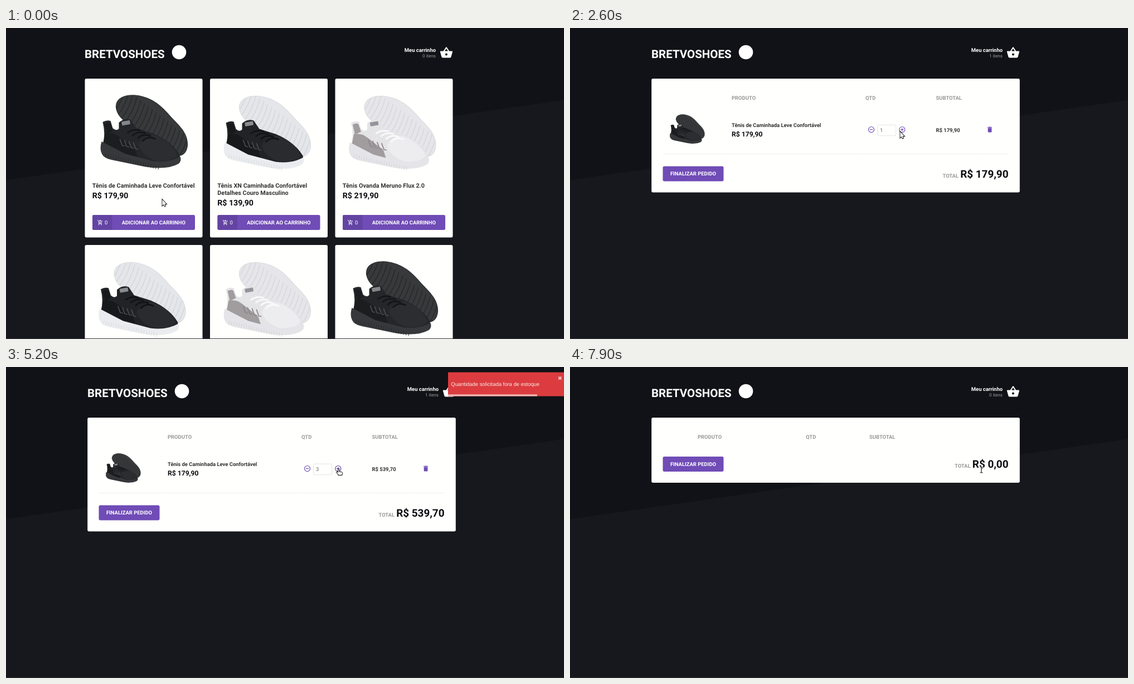
Recreate the animation shown at these times as an HTML page. Size 1001x559 px, loop 8000 ms.

```html
<!DOCTYPE html>
<html lang="pt-BR">
<head>
<meta charset="utf-8">
<title>Carrinho</title>
<style>
html, body { margin: 0; width: 100%; height: 100%; overflow: hidden; background: #17181d; }
svg { display: block; width: 1001px; height: 559px; font-family: Roboto, sans-serif; text-rendering: geometricPrecision; }
</style>
</head>
<body>
<svg id="stage" viewBox="0 0 1001 559"></svg>
<script>
const LOOP = 8000;
const PURPLE = '#704cb6', PURPLE_DARK = '#5f409c', PAPER = '#fffffd', GREY = '#999', INK = '#0b0b10', TEXT = '#333';
const SMALL = 9.43;

const ICON = {
  addCart: 'M11 9h2V6h3V4h-3V1h-2v3H8v2h3v3zm-4 9c-1.1 0-1.99.9-1.99 2S5.9 22 7 22s2-.9 2-2-.9-2-2-2zm10 0c-1.1 0-1.99.9-1.99 2s.89 2 1.99 2 2-.9 2-2-.9-2-2-2zm-9.83-3.25l.03-.12.9-1.63h7.45c.75 0 1.41-.41 1.75-1.03l3.86-7.01L19.42 4h-.01l-1.1 2-2.76 5H8.53l-.13-.27L6.16 6l-.95-2-.94-2H1v2h2l3.6 7.59-1.35 2.45c-.16.28-.25.61-.25.96 0 1.1.9 2 2 2h12v-2H7.42c-.13 0-.25-.11-.25-.25z',
  basket: 'M17.21 9l-4.38-6.56c-.19-.28-.51-.42-.83-.42s-.64.14-.83.43L6.79 9H2c-.55 0-1 .45-1 1 0 .09.01.18.04.27l2.54 9.27c.23.84 1 1.46 1.92 1.46h13c.92 0 1.69-.62 1.93-1.46l2.54-9.27L23 10c0-.55-.45-1-1-1h-4.79zM9 9l3-4.4L15 9H9zm3 8c-1.1 0-2-.9-2-2s.9-2 2-2 2 .9 2 2-.9 2-2 2z',
  trash: 'M6 19c0 1.1.9 2 2 2h8c1.1 0 2-.9 2-2V7H6v12zM19 4h-3.5l-1-1h-5l-1 1H5v2h14V4z'
};

const text = (x, y, s, { size = SMALL, fill = TEXT, bold = true, anchor = 'start', id = '' } = {}) =>
  `<text ${id && `id="${id}"`} x="${x}" y="${y}" font-size="${size}" fill="${fill}" font-weight="${bold ? 700 : 400}" text-anchor="${anchor}">${s}</text>`;
const rect = (x, y, w, h, fill, r = 0, extra = '') =>
  `<rect x="${x}" y="${y}" width="${w}" height="${h}" rx="${r}" fill="${fill}" ${extra}/>`;
const path = (d, fill, extra = '') => `<path d="${d}" fill="${fill}" ${extra}/>`;
const line = (d, color, w) => path(d, 'none', `stroke="${color}" stroke-width="${w}" stroke-linecap="round" stroke-linejoin="round"`);
const icon = (name, x, y, k, fill, id = '') => path(ICON[name], fill, `id="${id}" transform="translate(${x} ${y}) scale(${k})"`);
const group = (id, body) => `<g id="${id}">${body}</g>`;

// Shoe pairs, drawn in card coordinates
const BACK = 'M56 52C55 35 71 29 91 30C121 33 139 51 155 70C169 85 184 97 184 119C183 135 173 140 163 138L81 81C67 75 58 65 56 52Z';
const UPPER = 'M32 78Q39 74 46 76L50 89Q56 95 61 90L61 79Q71 70 82 74L92 89L121 98Q155 112 170 137Q172 147 165 150L127 152L31 121Q38 101 32 78Z';
const SOLE = 'M30 113Q25 129 33 139Q38 144 48 146L106 158Q147 165 168 153Q174 148 171 140Q150 152 121 148L72 135Z';
const LOOKS = {
  black: { back: '#38393b', groove: '#28292b', rim: '#2b2c2e', upper: '#252629', mesh: '#2c2d31', heel: '#1c1d1f', sole: '#37383b', ridge: '#28292b', lace: '#141517', tag: '#85868a' },
  mixed: { back: '#e5e6ea', groove: '#d6d7dc', rim: '#dcdde1', upper: '#222326', mesh: '#2a2b2f', heel: '#18191b', sole: '#ebecef', ridge: '#d9dade', lace: '#111214', tag: '#8b8c90' },
  white: { back: '#e6e6ea', groove: '#d7d7dc', rim: '#dcdce0', upper: '#e4e4e7', mesh: '#ededef', heel: '#a19c9e', sole: '#e5e5e9', ridge: '#d4d4d9', lace: '#fafafb', tag: '#96949a' }
};

function shoe(look) {
  const c = LOOKS[look];
  let grooves = '', ridges = '', laces = '', bars = '';
  for (let i = 0; i < 18; i++) {
    const x = 56 + i * 7, y = 46 + i * 5.4;
    grooves += `M${x - 20} ${y + 28}Q${x + 6} ${y + 12} ${x + 16} ${y - 28}`;
  }
  for (let i = 0; i < 22; i++) ridges += `M${38 + i * 4.5} ${135 + i * 1.05}l-1 6`;
  for (let i = 0; i < 4; i++) {
    laces += `M${77 + i * 9} ${97 + i * 5}Q${86 + i * 9} ${90 + i * 4} ${99 + i * 9} ${93 + i * 5}`;
    bars += `M${63 + i * 8} ${109 + i * 2}l4 11l4 1`;
  }
  return path(BACK, c.back) +
    `<g clip-path="url(#tread)">${line(grooves, c.groove, 1.6)}</g>` +
    line(BACK, c.rim, 1.2) +
    path(UPPER, c.upper) +
    path('M96 119Q108 99 126 102Q156 114 166 137Q160 148 130 148Q104 141 96 119Z', c.mesh) +
    path('M37 98Q52 96 62 105L90 127L96 146L32 124Z', c.heel) +
    path('M35 81Q41 78 45 80L50 94L39 99Z', c.heel) +
    path(SOLE, c.sole) + line(ridges, c.ridge, 1) +
    line(bars, look === 'white' ? '#8c878a' : '#4a4b4f', 1.8) + line(laces, c.lace, 2.8) +
    rect(66, 76, 15, 7, c.tag, 1, 'transform="rotate(-10 74 79)"');
}

const GRID_X = [141.5, 366, 590.5];
const PRODUCTS = [
  { look: 'black', name: ['Tênis de Caminhada Leve Confortável'], price: 'R$ 179,90' },
  { look: 'mixed', name: ['Tênis XN Caminhada Confortável', 'Detalhes Couro Masculino'], price: 'R$ 139,90' },
  { look: 'white', name: ['Tênis Ovanda Meruno Flux 2.0'], price: 'R$ 219,90' }
];

function card(p, x, y, id) {
  const end = 195.5 + (p.name.length - 1) * 13.5;
  const shift = p.look === 'black' ? '0 0' : '-3.5 1.5';
  const tag = s => id ? id + s : '';
  return `<g transform="translate(${x} ${y})">` +
    rect(0, 0, 211, 285.5, PAPER, 2.7) +
    `<g transform="translate(${shift})">${shoe(p.look)}</g>` +
    p.name.map((s, i) => text(13.3, 195.5 + i * 13.5, s, { size: 10.8 })).join('') +
    text(13.3, end + 19, p.price, { size: 14.15, fill: INK }) +
    rect(13.5, 245, 184, 27, PURPLE, 2.7, `id="${tag('Button')}"`) +
    path('M49 245H16.2a2.7 2.7 0 0 0-2.7 2.7v21.6a2.7 2.7 0 0 0 2.7 2.7H49z', '#6344a3') +
    icon('addCart', 22, 253.3, .449, '#fff') +
    text(35.4, 262.2, '0', { fill: '#fff', bold: false, id: tag('Count') }) +
    text(123.3, 262, 'ADICIONAR AO CARRINHO', { fill: '#fff', anchor: 'middle' }) + '</g>';
}

const shop = [0, 1].map(row => GRID_X.map((x, i) =>
  card(PRODUCTS[(i + row) % 3], x, 91 + row * 299, row + i ? '' : 'first')).join('')).join('');

const header = text(141, 54.4, 'BRETVOSHOES', { size: 20.5, fill: '#fff' }) +
  '<circle cx="310.5" cy="43.5" r="12.8" fill="#fff"/>' +
  text(771, 42.6, 'Meu carrinho', { fill: '#fff', anchor: 'end' }) +
  text(771, 53.3, '0 itens', { size: 8.09, fill: GREY, bold: false, anchor: 'end', id: 'items' }) +
  icon('basket', 777.8, 32.3, 1.011, '#fff');

const roundIcon = (id, x, sign) =>
  `<g id="${id}" color="${PURPLE}" transform="translate(${x} 182.6) scale(.5617)" fill="none" stroke="currentColor" stroke-width="2"><circle r="9"/><path d="${sign}"/></g>`;
const CELLS = [[167, 282], [283.3, 521.5], [522.8, 648.5], [649.8, 734], [735.3, 786]];

const item = `<g transform="translate(179 155.5) scale(.4) translate(-28 -30)">${shoe('black')}</g>` +
  text(290, 178, PRODUCTS[0].name[0]) +
  text(290, 194.7, PRODUCTS[0].price, { size: 12.13, fill: INK }) +
  roundIcon('minus', 540.5, 'M-5 0H5') + roundIcon('plus', 595.8, 'M-5 0H5M0-5V5') +
  rect(551.5, 174.2, 33.2, 19.4, PAPER, 2.7, 'stroke="#ddd" stroke-width=".8"') +
  text(556, 187.2, '1', { fill: '#666', bold: false, id: 'qty' }) +
  text(656.5, 186.6, '', { id: 'sub' }) +
  icon('trash', 746.3, 175.8, .5617, PURPLE, 'trash') +
  CELLS.map(([a, b]) => rect(a, 226.2, b - a, .7, '#e9e9e9')).join('');

const cart = rect(146.2, 91, 660.6, 204.5, PAPER, 2.7, 'id="panel"') +
  ['PRODUTO', 'QTD', 'SUBTOTAL'].map((s, i) => text(0, 129.4, s, { fill: GREY, id: 'head' + i })).join('') +
  group('item', item) +
  group('footer', rect(166.5, 248.5, 109, 27, PURPLE, 2.7) +
    text(221, 265.4, 'FINALIZAR PEDIDO', { fill: '#fff', anchor: 'middle' }) +
    text(697, 268.7, 'TOTAL', { fill: GREY, anchor: 'end', id: 'label' }) +
    text(786.5, 268.7, '', { size: 18.87, fill: INK, anchor: 'end', id: 'total' }));

const toast = rect(0, 9.5, 216, 43, '#dc3c3f') +
  `<text x="5.3" y="34.2" font-size="${SMALL}" fill="#fbe9e8" font-family="'Liberation Sans', Arial, sans-serif">Quantidade solicitada fora de estoque</text>` +
  path('M198.2 17.5l5 5m0-5l-5 5', 'none', 'stroke="#f3c9c8" stroke-width="2"') +
  rect(0, 49.2, 0, 3.3, '#f0b5b3', 0, 'id="bar"');

const BEAM = 'M-2-5Q0-5 0-4V4Q0 5-2 5M2-5Q0-5 0-4M0 4Q0 5 2 5';
const cursors = group('arrow', path('M.4.5V11.3L2.9 9 4.6 12.6 6.2 11.9 4.6 8.3H7.7Z', '#fff', 'stroke="#000" stroke-width="1.7" paint-order="stroke"')) +
  group('hand', path('M-1.5 1.3a1.2 1.2 0 0 1 2.4 0v3.5l4.4.8q1.4.4 1.3 1.8l-.6 2.3v1.6h-7.2V9.9L-4.3 6.5q-.4-1.5 1.1-1.4l1.7 1.2z', '#fff', 'stroke="#000" stroke-width="1"')) +
  group('beam', line(BEAM, '#fff', 2.6) + line(BEAM, '#1c1c20', 1.2));

const stage = document.getElementById('stage');
stage.innerHTML = `<defs><clipPath id="tread"><path d="${BACK}"/></clipPath></defs>` +
  rect(0, 0, 1001, 559, '#17181d') + path('M0 0H1001V129.5L0 273.5Z', '#111217') +
  group('header', header) + group('shop', shop) + group('cart', cart) +
  group('toast', toast) + rect(0, 558, 1001, 1, '#2b3138') + group('cursor', cursors);

const el = {};
stage.querySelectorAll('[id]').forEach(n => { if (n.id) el[n.id] = n; });
const set = (id, attrs) => { for (const k in attrs) el[id].setAttribute(k, attrs[k]); };
const show = (id, on) => set(id, { display: on ? 'inline' : 'none' });
const move = (id, x, y = 0) => set(id, { transform: `translate(${x} ${y})` });
const write = (id, s) => { if (el[id].textContent !== s) el[id].textContent = s; };

// time, x, y, shape
const POINTER = [
  [0, 280, 308, 'arrow'], [100, 280, 308, 'arrow'], [200, 280.5, 308, 'arrow'], [300, 280.5, 308, 'arrow'],
  [400, 278.5, 312.5, 'arrow'], [500, 278.5, 312.5, 'arrow'], [700, 254, 335, 'arrow'], [800, 245.5, 342, 'hand'],
  [1300, 244.5, 341.5, 'arrow'], [1600, 244.5, 341.5, 'arrow'], [2100, 386, 227, 'arrow'], [2200, 386, 227, 'arrow'],
  [2600, 592, 186, 'arrow'], [2800, 592, 186, 'arrow'], [2900, 597, 183.2, 'hand'], [6200, 597, 183.2, 'hand'],
  [6300, 635, 185, 'arrow'], [6400, 688, 185.5, 'beam'], [6500, 748, 184, 'arrow'], [6600, 752, 182.7, 'hand'],
  [7800, 752, 182.7, 'hand'], [7900, 738, 185, 'beam']
];
const SLIDE = [[4800, 850], [4900, 792], [5000, 799.5], [5100, 790.2], [5200, 793], [5300, 793.5], [7500, 793.5], [7600, 783], [7700, 876.5], [7800, 1010]];

function sample(keys, t) {
  let i = 0;
  while (i < keys.length - 1 && keys[i + 1][0] <= t) i++;
  const a = keys[i], b = keys[i + 1] || a;
  const k = b === a ? 0 : Math.max(0, (t - a[0]) / (b[0] - a[0]));
  return a.map((v, n) => typeof v === 'number' ? v + (b[n] - v) * k : v);
}
const money = cents => 'R$ ' + (cents / 100).toFixed(2).replace('.', ',');

function render(ms) {
  const t = Math.floor(ms / 100) * 100;
  const inCart = t >= 1300, empty = t >= 7900;
  const qty = empty ? 0 : t >= 3900 ? 3 : t >= 3100 ? 2 : 1;
  const lift = empty ? -87.5 : 0;

  show('shop', !inCart);
  show('cart', inCart);
  move('header', inCart ? 5 : 0);
  write('items', (t >= 1200 && !empty ? 1 : 0) + ' itens');
  write('firstCount', t >= 1200 ? '1' : '0');
  set('firstButton', { fill: t >= 700 ? PURPLE_DARK : PURPLE });

  show('item', !empty);
  (empty ? [229, 423, 537] : [290, 530, 656.5]).forEach((x, i) => set('head' + i, { x }));
  set('panel', { height: 204.5 + lift });
  move('footer', 0, lift);
  set('label', { x: empty ? 718.5 : 697 });
  write('qty', String(qty));
  write('sub', money(qty * 17990));
  write('total', money(qty * 17990));
  set('plus', { color: t >= 2900 && t < 6300 ? PURPLE_DARK : PURPLE });
  set('trash', { fill: t >= 6600 ? PURPLE_DARK : PURPLE });

  show('toast', t >= 4800 && t < 7800);
  move('toast', sample(SLIDE, t)[1]);
  set('toast', { opacity: t >= 7700 ? .92 : 1 });
  set('bar', { width: t < 7600 ? Math.max(0, 159.8 - (t - 5200) * .0675) : 0 });

  const [, px, py, shape] = sample(POINTER, t);
  move('cursor', px, py);
  ['arrow', 'hand', 'beam'].forEach(s => show(s, s === shape));
}

const start = performance.now();
function tick() {
  render((performance.now() - start) % LOOP);
  requestAnimationFrame(tick);
}
render(0);
requestAnimationFrame(tick);
</script>
</body>
</html>
```
